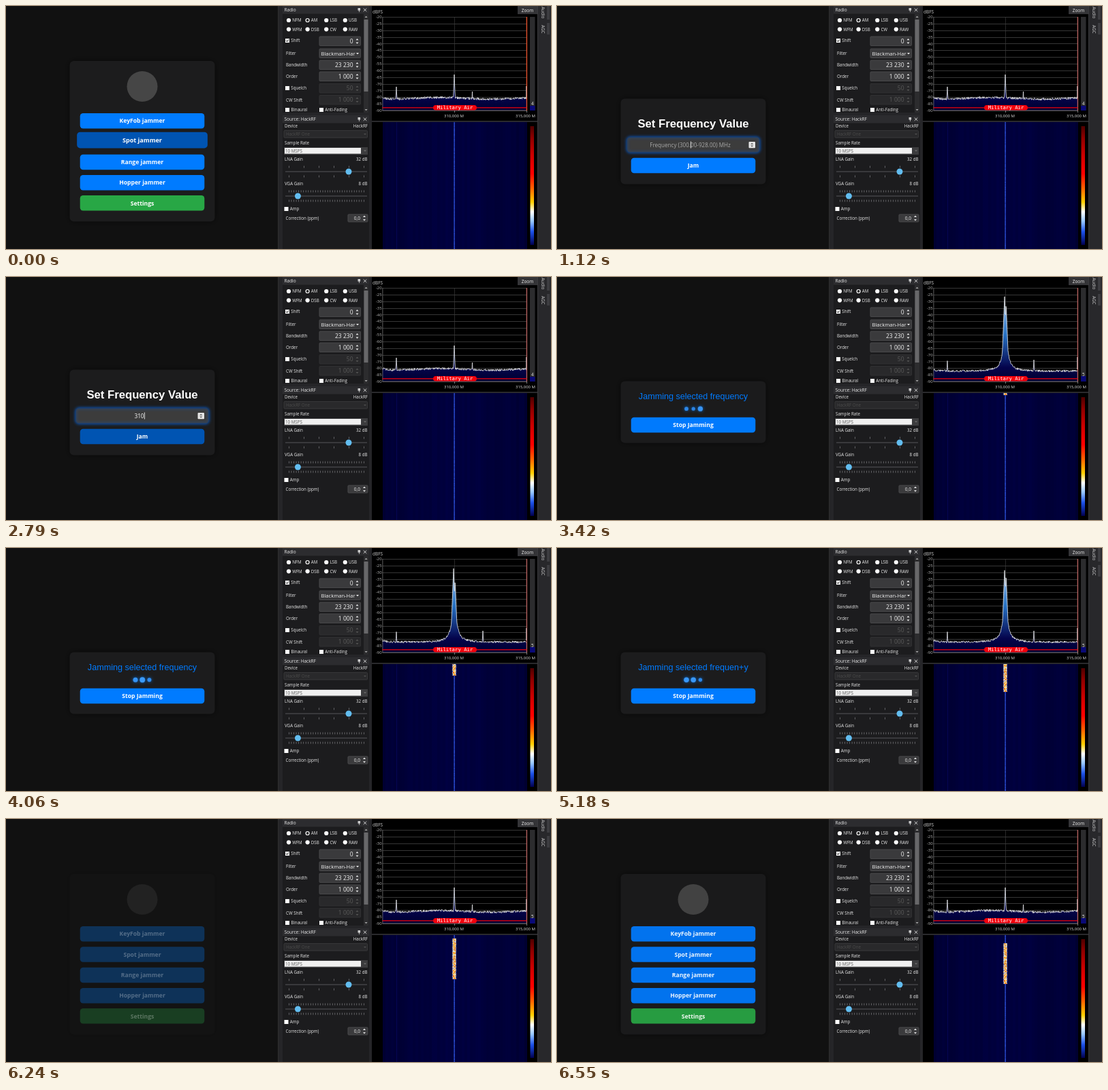
Write an HTML page with a canvas that moves like this. It is 800 px wide and 358 px high and loops after 6580 ms.

```html
<!DOCTYPE html>
<html lang="en">
<head>
<meta charset="utf-8">
<title>Spot mode demo</title>
<style>
html, body { margin: 0; width: 100%; height: 100%; overflow: hidden; background: #111; }
canvas { display: block; width: 800px; height: 358px; }
</style>
</head>
<body>
<canvas id="stage"></canvas>
<script>
const LOOP = 6580;
const OPEN_FORM = 130, FOCUS = 900, HOVER_JAM = 2620, OPEN_JAM = 2900;
const SIGNAL_ON = 3285, HOVER_STOP = 5930, OPEN_MENU = 6010, SIGNAL_OFF = 6005;
const KEYS = [1850, 2100, 2350];
const SCROLL = 0.022; // waterfall pixels per ms
const UI = '"Open Sans", "Noto Sans", sans-serif';
const ARIAL = '"Liberation Sans", Arial, sans-serif';
const MONO = '"DejaVu Sans Mono", monospace';

const canvas = document.getElementById('stage');
const ctx = canvas.getContext('2d');
const dpr = window.devicePixelRatio || 1;
canvas.width = 800 * dpr;
canvas.height = 358 * dpr;

const clamp = v => Math.max(0, Math.min(1, v));
const ease = v => { v = clamp(v); return v * v * (3 - 2 * v); };
const mix = (a, b, k) => `rgb(${a.map((v, i) => Math.round(v + (b[i] - v) * k))})`;

function rand(a, b) {
  let h = Math.imul(a + 11, 374761393) ^ Math.imul(b + 7, 668265263);
  h = Math.imul(h ^ (h >>> 13), 1274126177);
  return ((h ^ (h >>> 16)) >>> 0) / 4294967296;
}

function rect(x, y, w, h, fill) {
  ctx.fillStyle = fill;
  ctx.fillRect(x, y, w, h);
}

function box(x, y, w, h, r, fill, stroke) {
  ctx.beginPath();
  ctx.roundRect(x, y, w, h, r);
  ctx.fillStyle = fill;
  ctx.fill();
  if (stroke) {
    ctx.strokeStyle = stroke;
    ctx.lineWidth = 1;
    ctx.stroke();
  }
}

function disc(x, y, r, fill) {
  ctx.beginPath();
  ctx.arc(x, y, r, 0, 7);
  ctx.fillStyle = fill;
  ctx.fill();
}

function text(s, x, y, size, fill, align = 'left', family = UI, weight = '') {
  ctx.font = `${weight} ${size}px ${family}`;
  ctx.textAlign = align;
  ctx.fillStyle = fill;
  ctx.fillText(s, x, y);
}

function arrow(x, y, d, fill) {
  ctx.beginPath();
  ctx.moveTo(x - 2, y);
  ctx.lineTo(x + 2, y);
  ctx.lineTo(x, y + 2.3 * d);
  ctx.fillStyle = fill;
  ctx.fill();
}

function glow(color, blur, draw) {
  ctx.save();
  ctx.shadowColor = color;
  ctx.shadowBlur = blur * dpr;
  draw();
  ctx.restore();
}

// ---- left: web page ----

function card(y, h) {
  glow('rgba(0,0,0,.5)', 8, () => box(93.5, y, 213, h, 6, '#1c1c1d'));
}

function button(label, y, hover = 0, zoom = 1, base = [0, 123, 255], dark = [0, 84, 178]) {
  ctx.save();
  ctx.translate(200, y);
  ctx.scale(zoom, zoom);
  box(-91.3, -11.3, 182.6, 22.6, 4.5, mix(base, dark, hover));
  text(label, 0, 3.2, 8.6, '#fff', 'center', UI, 'bold');
  ctx.restore();
}

function menuPage(hover) {
  card(81, 236.5);
  disc(200, 118.5, 22.5, '#464646');
  button('KeyFob jammer', 169.2);
  button('Spot jammer', hover ? 197.6 : 199.5, hover, 1 + 0.05 * hover);
  button('Range jammer', 230);
  button('Hopper jammer', 260.2);
  button('Settings', 290.3, 0, 1, [40, 167, 69]);
}

function formPage(t) {
  card(136.5, 126);
  text('Set Frequency Value', 200, 178.7, 16.7, '#fff', 'center', ARIAL, 'bold');
  const f = ease((t - FOCUS) / 250);
  const w = 182 + 13 * f, h = 21 + 1.5 * f;
  glow(`rgba(0,110,255,${0.8 * f})`, 4, () =>
    box(200 - w / 2, 204.5 - h / 2, w, h, 4.5, '#3c3c3c', mix([68, 68, 68], [28, 62, 108], f)));

  const typed = KEYS.filter(k => t >= k);
  const value = '310'.slice(0, typed.length);
  let caret = 196;
  if (value) {
    text(value, 195.5, 207.7, 8.3, '#fff', 'center');
    caret = 195.8 + ctx.measureText(value).width / 2;
  } else {
    text('Frequency (300.00-928.00) MHz', 195.5, 207.7, 8.1, '#a9a9a9', 'center');
  }
  const since = t - (typed.length ? typed[typed.length - 1] : FOCUS);
  if (since >= 0 && since % 1060 < 530) rect(caret, 199.5, 0.8, 10, '#fff');

  if (f > 0) {
    box(281.5, 200, 9.5, 9.3, 1, '#e4e4e4');
    arrow(286.2, 203.7, -0.8, '#555');
    arrow(286.2, 205.6, 0.8, '#555');
  }
  button('Jam', 235, ease((t - HOVER_JAM) / 150));
}

function glitched(t) {
  const s = 'Jamming selected frequency';
  const n = Math.floor(t / 100);
  const k = n >> 1;
  const i = (5 * k * k + 5 * k + 14) % 27;
  if (n % 2 === 0 || i >= s.length || s[i] === ' ') return s;
  return s.slice(0, i) + '!+#%*^&='[k % 8] + s.slice(i + 1);
}

function jamPage(t) {
  card(153.5, 91);
  text(glitched(t), 200, 180, 12.6, '#007bff', 'center', ARIAL);
  for (let i = 0; i < 3; i++) {
    const p = Math.cos(Math.PI * (t - 4132 - (i - 1) * 300) / 1200) ** 2;
    glow('rgba(0,123,255,.8)', 4, () =>
      disc(190 + i * 10.2, 194.2, 2.5 + 1.5 * p, mix([42, 130, 225], [60, 155, 250], p)));
  }
  button('Stop Jamming', 218, ease((t - HOVER_STOP) / 120));
}

function webPage(t) {
  rect(0, 0, 400, 358, '#111');
  const fade = (start, len) => { ctx.globalAlpha = ease((t - start) / len); };
  if (t < OPEN_FORM) menuPage(1);
  else if (t < OPEN_JAM) { fade(OPEN_FORM, 550); formPage(t); }
  else if (t < OPEN_MENU) { fade(OPEN_JAM, 550); jamPage(t); }
  else { fade(OPEN_MENU, 650); menuPage(0); }
  ctx.globalAlpha = 1;
}

// ---- middle: receiver settings ----

const label = (s, x, y, align, fill = '#e8e8e8') => text(s, x, y, 6.2, fill, align);

function titleBar(s, y) {
  rect(406, y, 127, 11.5, '#2c2c2f');
  text(s, 408.5, y + 8.3, 6.5, '#e8e8e8');
  rect(516.5, y + 3, 3.6, 3.6, '#ccc');
  rect(518, y + 6, 0.8, 3, '#ccc');
  ctx.strokeStyle = '#ddd';
  ctx.lineWidth = 0.9;
  ctx.beginPath();
  ctx.moveTo(524.7, y + 3.5); ctx.lineTo(529.3, y + 8);
  ctx.moveTo(529.3, y + 3.5); ctx.lineTo(524.7, y + 8);
  ctx.stroke();
}

function check(x, y, s, on) {
  rect(x, y - 3, 6, 6, '#fff');
  if (on) {
    ctx.strokeStyle = '#111';
    ctx.lineWidth = 1;
    ctx.beginPath();
    ctx.moveTo(x + 1.2, y); ctx.lineTo(x + 2.5, y + 1.6); ctx.lineTo(x + 4.8, y - 1.6);
    ctx.stroke();
  }
  label(s, x + 8.3, y + 2.3);
}

function field(x, y, w, h, value, size, on = true) {
  box(x, y, w, h, 1, on ? '#3a3a3c' : '#29292b', on ? '#48484a' : '#303032');
  text(value, x + w - 11, y + h / 2 + size * 0.36, size, on ? '#f2f2f2' : '#5a5a5a', 'right');
  const c = on ? '#f0f0f0' : '#555';
  arrow(x + w - 5, y + h / 2 - 1.5, -1, c);
  arrow(x + w - 5, y + h / 2 + 1.8, 1, c);
}

function slider(y, ticks, pos) {
  rect(410, y - 0.5, 120, 1, '#57575a');
  for (let i = 0; i < ticks; i++) {
    const x = 415 + 110 * i / (ticks - 1);
    rect(x, y - 8.5, 0.8, 3, '#77777a');
    rect(x, y + 5.5, 0.8, 3, '#77777a');
  }
  disc(415 + 110 * pos, y, 4.5, '#62bdf0');
}

function settings() {
  rect(400, 0, 137, 358, '#252528');
  rect(399, 0, 1, 358, '#2e2e2e');
  rect(406, 0, 127, 157, '#1c1c1e');
  rect(406, 161, 127, 197, '#1c1c1e');
  titleBar('Radio', 0);
  'NFM AM LSB USB WFM DSB CW RAW'.split(' ').forEach((s, i) => {
    const x = 415 + 27.6 * (i % 4), y = i < 4 ? 21 : 34.3;
    disc(x, y, 3.1, '#fff');
    if (i === 1) disc(x, y, 1.9, '#222');
    label(s, x + 5.2, y + 2.4);
  });
  check(410, 51, 'Shift', true);
  label('Filter', 411, 72.2);
  label('Bandwidth', 411, 89.2);
  label('Order', 411, 106.2);
  check(410, 121, 'Squelch');
  label('CW Shift', 411, 140.6);
  field(460, 45, 60.5, 13.5, '0', 8.5);
  box(460, 63, 60.5, 13.5, 1, '#3a3a3c', '#48484a');
  text('Blackman-Har', 462.5, 72.7, 7.6, '#f2f2f2');
  arrow(516, 69, 1, '#eee');
  field(460, 80, 60.5, 13.5, '23 230', 8.5);
  field(460, 97, 60.5, 13.5, '1 000', 8.5);
  field(460, 114.5, 60.5, 13.5, '50', 8.5, false);
  field(460, 131.5, 60.5, 13.5, '1 000', 8.5, false);
  check(410, 153, 'Binaural');
  check(460, 153, 'Anti-Fading');
  rect(525, 12, 7.5, 145, '#2c2c2e');
  arrow(528.6, 17, -1, '#aaa');
  rect(525.5, 20, 6, 106, '#68686a');
  arrow(528.6, 152, 1, '#aaa');

  titleBar('Source: HackRF', 161);
  label('Device', 409, 179);
  label('HackRF', 531, 179, 'right');
  box(408, 183.5, 122.5, 10.5, 1, '#29292b', '#38383a');
  label('HackRF One', 411, 191, 'left', '#4c4c4c');
  arrow(527, 188, 0.8, '#555');
  label('Sample Rate', 409, 203.8);
  rect(408, 208, 123, 11, '#3c3c3e');
  rect(409, 209, 112, 8.6, '#f0f0f0');
  label('10 MSPS', 410, 215.6, 'left', '#555');
  arrow(527, 212.5, 0.8, '#777');
  label('LNA Gain', 409, 228.3);
  label('32 dB', 530.5, 228.3, 'right');
  slider(244, 6, 0.8);
  label('VGA Gain', 409, 263.5);
  label('8 dB', 530.5, 263.5, 'right');
  slider(280, 32, 0.122);
  check(408.5, 299, 'Amp');
  label('Correction (ppm)', 410.5, 315);
  field(502, 307, 29, 11, '0,0', 6.6);
}

// ---- right: spectrum and waterfall ----

const LEFT = 552.5, RIGHT = 764.5, TOP = 16, BOTTOM = 154, MID = 658;

function traceY(x, step, power) {
  const noise = rand(Math.round(x * 2), step);
  const floor = 136 + power * 2.5;
  let y = floor + (noise - 0.5) * 3.4 - 2.5 * Math.exp(-(x - LEFT) / 6);
  y -= (1 - power) * 1.2 * Math.sin((x - 600) / 24);
  const spike = (at, top, w) => { y = Math.min(y, top + Math.abs(x - at) / w * 20); };
  spike(573, power ? 123.5 : 119, 1);
  if (power) spike(700, 122, 1);
  else spike(684.5, 126, 1);
  spike(MID, 101, 0.8);
  if (power) {
    const d = Math.abs(x - MID);
    const skirt = floor - 72 * Math.exp(-d / 3.2) - 12 * Math.exp(-d / 13);
    y = Math.min(y, skirt + (noise - 0.5) * 3);
    spike(MID - 1, 26 + 8 * rand(step, 3), 0.8);
    spike(MID + 1.2, 37 + 11 * rand(step, 5), 0.8);
    if (power < 1) y = Math.max(y, 74);
  }
  return y;
}

function spectrum(t) {
  rect(537, 0, 243, 169, '#000');
  rect(751, 0, 29, 12, '#343437');
  text('Zoom', 765.5, 8.6, 6.5, '#eee', 'center');
  text('dBFS', 538, 11, 6.5, '#ccc');
  for (let i = 0; i <= 14; i++) {
    const y = TOP + i * (BOTTOM - TOP) / 14;
    rect(LEFT, Math.round(y), RIGHT - LEFT, 1, '#363636');
    text(String(-20 - 5 * i), 551.5, y + 2.2, 5.8, '#bbb', 'right');
  }
  rect(MID, TOP, 0.7, BOTTOM - TOP, '#3c3c3c');

  const on = t >= SIGNAL_ON + 35 && t < SIGNAL_OFF + 20;
  const edge = t < SIGNAL_ON + 70 || t > SIGNAL_OFF - 15;
  const power = on ? (edge ? 0.6 : 1) : 0;
  const step = Math.floor(t / 66);
  const line = new Path2D();
  for (let x = LEFT; x <= RIGHT; x += 0.5) line.lineTo(x, traceY(x, step, power));
  const area = new Path2D(line);
  area.lineTo(RIGHT, BOTTOM);
  area.lineTo(LEFT, BOTTOM);
  const g = ctx.createLinearGradient(0, TOP, 0, BOTTOM);
  g.addColorStop(0, '#cfe4ff');
  g.addColorStop(0.5, '#2672c4');
  g.addColorStop(0.85, '#04044c');
  g.addColorStop(1, '#000030');
  ctx.fillStyle = g;
  ctx.fill(area);
  ctx.strokeStyle = '#eee';
  ctx.lineWidth = 0.8;
  ctx.stroke(line);

  rect(LEFT, TOP, 0.8, BOTTOM - TOP, '#777');
  rect(LEFT, BOTTOM - 0.5, RIGHT - LEFT, 0.8, '#777');
  rect(763.7, TOP, 1.4, BOTTOM - TOP, t < 300 ? '#e0502c' : '#b4605e');
  rect(763.4, 118, 0.8, 18, '#eee');

  rect(LEFT, 149.2, RIGHT - LEFT, 1.3, '#e8000c');
  box(627, 146, 64, 7.6, 3.8, '#f4000c');
  text('Military Air', 659, 152.2, 7.3, '#fff', 'center', MONO);
  rect(MID, BOTTOM, 0.8, 3, '#999');
  rect(764, BOTTOM, 0.8, 3, '#999');
  text('310,000 M', 657.5, 163.7, 6, '#ddd', 'center');
  text('315,000 M', 777, 163.7, 6, '#ddd', 'right');

  const four = t < SIGNAL_ON || (t > 5500 && t < 6030);
  rect(769, TOP, 7.5, BOTTOM - TOP, '#2c2c2e');
  rect(769, four ? 147 : 146, 7.5, four ? 7 : 8, '#0a0a78');
  text(four ? '4' : '5', 772.8, 145.5, 6.2, '#eee', 'center');
}

const HOT = ['#ff9a2a', '#f07820', '#ffc850', '#ffe9a0', '#d89040', '#b8d0f0'];
const BAR = ['#500000', '#900000', '#cc0000', '#ff0000', '#ff6000', '#ffd000',
  '#ffffff', '#98c8ff', '#1c50e8', '#000050'];
const BAR_AT = [0, 0.1, 0.24, 0.4, 0.52, 0.64, 0.72, 0.8, 0.89, 1];

function waterfall(t) {
  rect(537, 169, 243, 2, '#2a2a2d');
  rect(537, 171, 243, 187, '#000');
  const navy = ctx.createLinearGradient(553, 0, 765, 0);
  navy.addColorStop(0, '#000030');
  navy.addColorStop(0.5, '#00003c');
  navy.addColorStop(1, '#000030');
  rect(553, 171, 212, 187, navy);
  for (let i = 0; i < 53; i++)
    rect(553 + i * 4, 171, 4, 187, `rgba(0,0,110,${0.15 * rand(i, 1)})`);
  rect(573, 171, 0.8, 187, '#06065c');

  const head = Math.floor(t * SCROLL);
  const first = Math.floor(SIGNAL_ON * SCROLL), last = Math.floor(SIGNAL_OFF * SCROLL);
  for (let y = 171; y < 358; y++) {
    const row = head - (y - 171);
    const v = 0.75 + 0.25 * rand(row + 500, 2);
    rect(657.4, y, 1.4, 1, mix([0, 0, 64], [50, 92, 235], v));
    if (row <= first || row > last) continue;
    for (let c = 0; c < 6; c++) {
      const n = rand(row, c + 20);
      const side = c === 0 || c === 5;
      rect(655 + c, y, 1, 1, side ? mix([50, 80, 190], [225, 190, 150], n) : HOT[Math.floor(n * HOT.length)]);
    }
  }

  const g = ctx.createLinearGradient(0, 177, 0, 352);
  BAR.forEach((c, i) => g.addColorStop(BAR_AT[i], c));
  rect(769.5, 177, 5.5, 175, g);
}

function sideTabs() {
  rect(780, 0, 20, 358, '#28282b');
  rect(780, 0, 1, 358, '#3a3a3d');
  rect(794, 0, 4, 20, '#3c3c40');
  rect(794, 25, 4, 17, '#3c3c40');
  [['Audio', 1], ['AGC', 28]].forEach(([s, y]) => {
    ctx.save();
    ctx.translate(785.5, y);
    ctx.rotate(Math.PI / 2);
    text(s, 0, 0, 6.4, '#ccc');
    ctx.restore();
  });
}

const begin = performance.now();
function frame(now) {
  const t = Math.max(0, now - begin) % LOOP;
  ctx.setTransform(dpr, 0, 0, dpr, 0, 0);
  webPage(t);
  settings();
  spectrum(t);
  waterfall(t);
  sideTabs();
  requestAnimationFrame(frame);
}
frame(begin);
</script>
</body>
</html>
```
